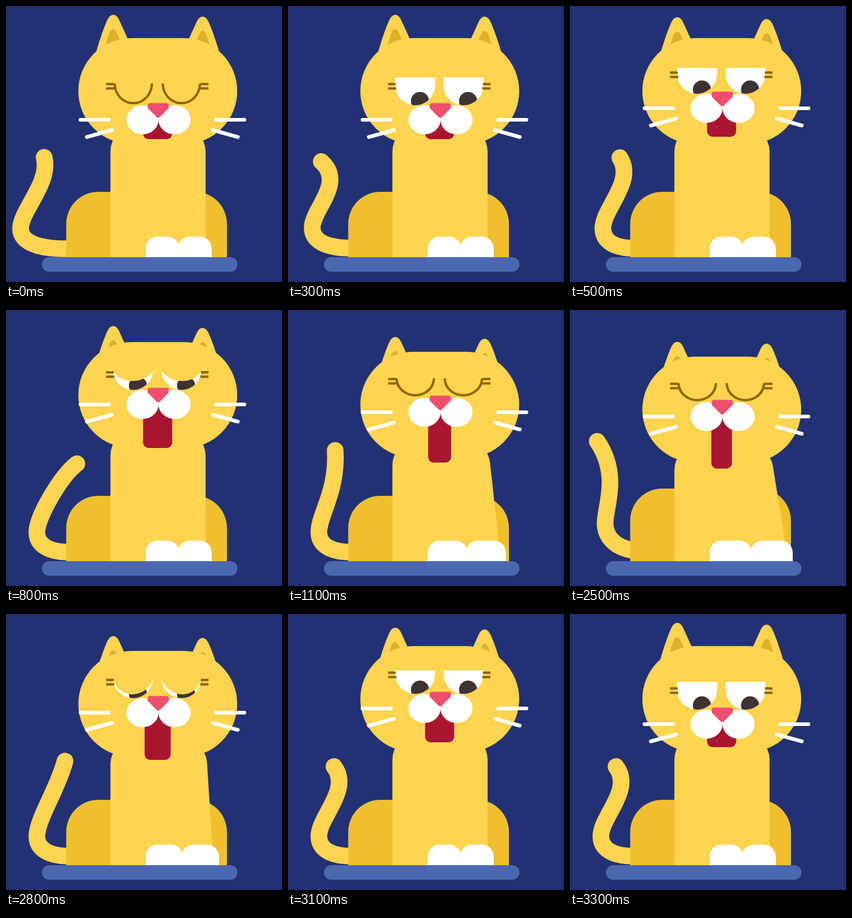
An HTML page with a canvas that plays this animation: 456 px wide and 456 px high, repeating every 3.4 s.

```html
<!DOCTYPE html>
<html lang="en">
<head>
<meta charset="utf-8">
<title>Yawning cat</title>
<style>
  html, body { margin: 0; height: 100%; overflow: hidden; background: #223173; }
  canvas { display: block; width: 100vmin; height: 100vmin; }
</style>
</head>
<body>
<canvas id="stage"></canvas>
<script>
const SIZE = 456, LOOP = 3400;
const COLOR = {
  night: '#223173', shelf: '#4a68af', fur: '#ffd44f', shade: '#f0c02c', ear: '#ddb128',
  lash: '#8f6a00', pupil: '#3e3232', nose: '#ef4f6d', mouth: '#aa1530', white: '#fff'
};

const canvas = document.getElementById('stage');
const scale = Math.max(1, window.devicePixelRatio || 1);
canvas.width = canvas.height = SIZE * scale;
const ctx = canvas.getContext('2d');

// Spine of the tail: two cubic curves, from the base over the bend to the tip
const TAIL = {
  far:     [105,401, 58,402, 24,392, 24,368, 24,338, 74,292, 63,250],
  curl:    [105,400, 62,400, 40,388, 40,366, 40,336, 95,292, 55,257],
  hook:    [105,400, 70,400, 51,388, 51,367, 51,335, 105,290, 76,252],
  flick:   [105,400, 70,400, 51,388, 51,367, 51,342, 90,275, 117,254],
  rise:    [105,400, 70,400, 51,388, 51,367, 51,338, 82,300, 78,232],
  sway:    [105,397, 75,393, 58,375, 58,352, 58,325, 83,273, 45,217],
  stretch: [108,396, 85,383, 73,360, 66,332, 58,290, 45,240, 26,196]
};
const mix = (a, b, k) => TAIL[a].map((v, i) => v + (TAIL[b][i] - v) * k);

// Offsets are relative to the head, which sinks by `drop`
const rest = {
  drop: 0, ear: 0, face: 0, lash: 0, lid: 118, dip: 0, closed: 0,
  jaw: 220, jawWidth: 48, rear: 307, reach: 0, tail: TAIL.hook
};
const pose = changes => ({ ...rest, ...changes });

const lift = pose({ face: -6, lash: -6, lid: 112 });
const raise = pose({ ear: 4, face: -19, lash: -19, lid: 102.5, jaw: 216, tail: mix('curl', 'hook', 1.3) });
const up = pose({ ear: 8, face: -32, lash: -32, lid: 93, jaw: 212 });
const droop = pose({ ear: 10, face: -32, lash: -29, lid: 97, dip: 11, tail: mix('hook', 'flick', .5) });
const gape = pose({ ear: 12, face: -32, lash: -26, lid: 100, dip: 23, jaw: 228, tail: TAIL.flick });
const sink = pose({ drop: 8, ear: 14, face: -33, lash: -28, lid: 100, dip: 33, jaw: 233,
  jawWidth: 43, reach: 12, tail: mix('flick', 'rise', .5) });
const yawn = { ear: 14, face: -36, lash: -31, closed: 28, jawWidth: 34 };
const lower = pose({ ...yawn, drop: 16, face: -35, jaw: 236, jawWidth: 38, reach: 20, tail: TAIL.rise });
const reach = pose({ ...yawn, drop: 24, jaw: 238, reach: 28, rear: 295, tail: TAIL.sway });
const stretch = pose({ ...yawn, drop: 32, jaw: 241, reach: 36, rear: 283.5, tail: TAIL.stretch });

const timeline = [
  [0, pose({ closed: 33, tail: TAIL.far })],
  [100, pose({ tail: mix('far', 'curl', 1 / 3) })],
  [200, pose({ tail: mix('far', 'curl', 2 / 3) })],
  [300, pose({ tail: TAIL.curl })],
  [400, lift], [500, raise], [600, up], [700, droop], [800, gape], [900, sink],
  [1100, lower], [1300, reach], [1500, stretch], [2500, reach], [2700, lower],
  [2800, sink], [2900, gape], [3000, droop], [3100, up], [3200, raise], [3300, lift]
];

function fill(color, path) {
  ctx.fillStyle = color;
  ctx.fill(typeof path === 'string' ? new Path2D(path) : path);
}
function stroke(color, width, path, cap = 'round') {
  ctx.strokeStyle = color;
  ctx.lineWidth = width;
  ctx.lineCap = cap;
  ctx.lineJoin = 'round';
  ctx.stroke(new Path2D(path));
}
function box(color, x, y, w, h, radii) {
  const path = new Path2D();
  path.roundRect(x, y, w, h, radii);
  fill(color, path);
}
function oval(color, x, y, rx, ry = rx) {
  const path = new Path2D();
  path.ellipse(x, y, rx, ry, 0, 0, 2 * Math.PI);
  fill(color, path);
}
function group(x, y, draw, flip = 1) {
  ctx.save();
  ctx.translate(x, y);
  ctx.scale(flip, 1);
  draw();
  ctx.restore();
}

function drawTail([x, y, ...curves]) {
  stroke(COLOR.fur, 27.5, `M${x},${y}C${curves}`);
}

function drawEar() {
  fill(COLOR.fur, 'M145,92C151,66 158.5,44 166.5,25C172,12 181,11 187,23L206,65V92Z');
  fill(COLOR.ear, 'M163,74C166,60 169,48 172,42Q177,34 182,42L193,66V74Z');
}

function drawBody(s) {
  const top = 200 + s.drop;
  const path = new Path2D();
  path.moveTo(172.5, 415);
  path.arcTo(172.5, top, 250, top, 40);
  path.arcTo(329.7, top, 330 + 1.1 * s.reach, 415, 40);
  path.lineTo(329.7 + 1.1 * s.reach, 415);
  fill(COLOR.fur, path);
}

function drawEye(s, pupilX) {
  const y = 131 + s.face;
  if (s.closed) {
    const end = 129.5 + s.lash;
    stroke(COLOR.lash, 4, `M179.5,${end}A30.8,${s.closed} 0 0 0 241,${end}`);
  } else {
    const bend = s.lid + s.dip;
    const ball = new Path2D(
      `M177,${s.lid}C187,${bend} 230,${bend} 243,${s.lid}V${y}A33,33 0 0 1 177,${y}Z`);
    fill(COLOR.white, ball);
    ctx.save();
    ctx.clip(ball);
    oval(COLOR.pupil, pupilX, 157 + s.face, 15);
    ctx.restore();
  }
  const lash = 129 + s.lash;
  stroke(COLOR.lash, 4, `M165.5,${lash}h12.5M165.5,${lash + 7.3}h13.5`, 'butt');
}

function drawMuzzle(s) {
  const top = 188 + s.face;
  box(COLOR.mouth, 250.5 - s.jawWidth / 2, top, s.jawWidth, s.jaw - top, [0, 0, 9, 9]);
  group(0, s.face, () => {
    oval(COLOR.white, 225.5, 188, 26.5, 24);
    oval(COLOR.white, 278.5, 188, 26.5, 24);
    const nose = 'M238,164.5H265V167L251.5,180.5L238,167Z';
    fill(COLOR.nose, nose);
    stroke(COLOR.nose, 8, nose);
    stroke(COLOR.white, 6, 'M123,188H170M133.5,216.5L175,205M347,188H394M342,205L383,216.5');
  });
}

function drawHead(s) {
  group(0, s.ear, drawEar);
  group(502, s.ear + 3, drawEar, -1);
  box(COLOR.fur, 119.5, 53, 262.5, 175, 87.5);
  drawEye(s, 218);
  group(500, 0, () => drawEye(s, 202.5), -1);
  drawMuzzle(s);
}

function drawCat(s) {
  drawTail(s.tail);
  box(COLOR.shade, 99.5, s.rear, 265.5, 415 - s.rear, [53, 53, 0, 0]);
  drawBody(s);
  group(0, s.drop, () => drawHead(s));
  const paw = (110 + s.reach) / 2;
  box(COLOR.white, 230.5, 381, paw + 0.5, 34.5, [20, 20, 0, 0]);
  box(COLOR.white, 229 + paw, 381, paw + 1, 34.5, [20, 20, 0, 0]);
}

function frame(now) {
  const time = now % LOOP;
  const [, state] = timeline.findLast(([start]) => start <= time);
  ctx.setTransform(scale, 0, 0, scale, 0, 0);
  ctx.fillStyle = COLOR.night;
  ctx.fillRect(0, 0, SIZE, SIZE);
  drawCat(state);
  box(COLOR.shelf, 59.5, 415, 323, 24, 12);
  requestAnimationFrame(() => frame(performance.now()));
}
frame(0);
</script>
</body>
</html>
```
